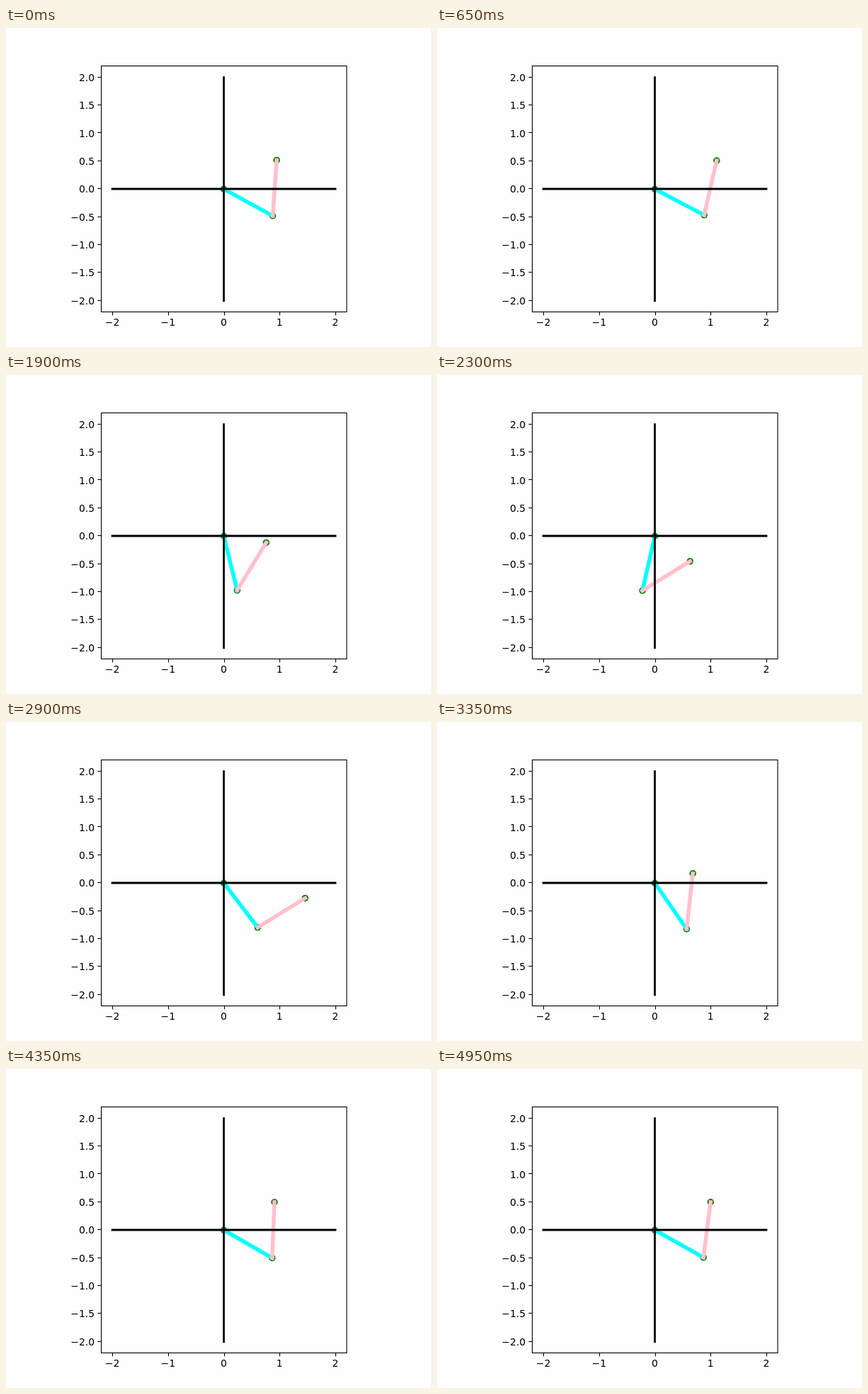
An HTML page with a canvas that plays this animation: 600 by 450 pixels, repeating every 5 s.

```html
<!DOCTYPE html>
<html lang="en">
<head>
<meta charset="utf-8">
<title>Two-link arm</title>
<style>
  html, body { margin: 0; width: 100%; height: 100%; overflow: hidden; background: #fefdff; }
  canvas { display: block; width: 600px; height: 450px; }
</style>
</head>
<body>
<canvas id="stage" width="600" height="450"></canvas>
<script>
const ctx = document.getElementById("stage").getContext("2d");
const STEPS = 100, STEP_MS = 50, SCALE = 78.75;
const px = x => 307.5 + x * SCALE;
const py = y => 227.25 - y * SCALE;
const snapX = x => Math.floor(x + 0.5) + 0.5;
const snapY = y => 450 - snapX(450 - y);

function line(x1, y1, x2, y2, color, width, cap = "butt") {
  ctx.strokeStyle = color;
  ctx.lineWidth = width;
  ctx.lineCap = cap;
  ctx.beginPath();
  ctx.moveTo(x1, y1);
  ctx.lineTo(x2, y2);
  ctx.stroke();
}

function marker([x, y]) {
  ctx.fillStyle = "#008000";
  ctx.beginPath();
  ctx.arc(px(x), py(y), 4.75, 0, 2 * Math.PI);
  ctx.fill();
}

function link(a, b, color) {
  line(px(a[0]), py(a[1]), px(b[0]), py(b[1]), color, 5.5, "square");
}

function drawFrame() {
  ctx.strokeStyle = "#000";
  ctx.lineWidth = 1.11;
  ctx.strokeRect(134.5, 53.5, 346.5, 347);
  ctx.fillStyle = "#000";
  ctx.font = '13.89px "DejaVu Sans", sans-serif';
  const label = (v, digits) => v.toFixed(digits).replace("-", "\u2212");
  ctx.textAlign = "center";
  for (let v = -2; v <= 2; v++) {
    const x = snapX(px(v));
    line(x, 400.5, x, 405.4, "#000", 1.11);
    ctx.fillText(label(v, 0), px(v), 420.3);
  }
  ctx.textAlign = "right";
  for (let v = -2; v <= 2; v += 0.5) {
    const y = snapY(py(v));
    line(129.4, y, 134.3, y, "#000", 1.11);
    ctx.fillText(label(v, 1), 125, py(v) + 5.1);
  }
}

// Minimum-jerk travel round a figure eight; the starting error dies away.
function handAt(i) {
  const s = i / (STEPS - 1);
  const u = 2 * Math.PI * s ** 3 * (10 - 15 * s + 6 * s * s);
  return [
    1 + 0.5 * Math.sin(2 * u) - 0.052 * Math.exp(-i / 6),
    0.5 * Math.cos(u) + 0.018 * Math.exp(-i / 40)
  ];
}

// Both links have length 1; the elbow stays below.
function elbowFor([x, y]) {
  const angle = Math.atan2(y, x) - Math.acos(Math.hypot(x, y) / 2);
  return [Math.cos(angle), Math.sin(angle)];
}

function draw(i) {
  const base = [0, 0], hand = handAt(i), elbow = elbowFor(hand);
  ctx.fillStyle = "#fefdff";
  ctx.fillRect(0, 0, 600, 450);
  [base, elbow, hand].forEach(marker);
  link(base, elbow, "#00ffff");
  link(elbow, hand, "#ffc0cb");
  line(px(-2), 227, px(2), 227, "#000", 2.78, "square");
  line(307.5, py(2), 307.5, py(-2), "#000", 2.78, "square");
  drawFrame();
}

const start = performance.now();
function tick() {
  draw(Math.floor((performance.now() - start) / STEP_MS) % STEPS);
  requestAnimationFrame(tick);
}
tick();
</script>
</body>
</html>
```
